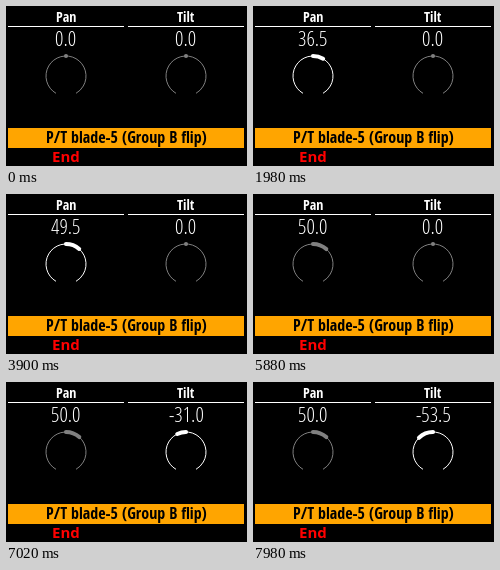
These frames come from a looping animation (241 px wide and 160 px high, 8000 ms). An HTML page with a canvas:

```html
<!DOCTYPE html>
<html lang="en">
<head>
<meta charset="utf-8">
<title>Pan / Tilt encoders</title>
<style>
html, body { margin: 0; height: 100%; background: #000; overflow: hidden; }
canvas { display: block; }
</style>
</head>
<body>
<canvas id="stage" width="241" height="160"></canvas>
<script>
const ctx = document.getElementById('stage').getContext('2d');
const LOOP = 8000, STEP = 60;
const BOLD = '"Open Sans Condensed", "Open Sans", "Noto Sans", sans-serif';
const LIGHT = '"Open Sans Condensed Light", "Open Sans Cond Light", "Open Sans", "Noto Sans", sans-serif';

const linear = u => u;
const gentle = u => 0.4 * u + 0.6 * u * u * (3 - 2 * u);
const easeOut = u => 1 - (1 - u) ** 1.375;

// Each turn moves the dial to a value between two times; it is lit while active.
const pan = {
  name: 'Pan', x: 60,
  turns: [
    { start: 1020, end: 2520, to: 54, ease: gentle },
    { start: 2580, end: 3060, to: 50, ease: linear },
    { start: 3840, end: 3900, to: 49.5, ease: linear },
    { start: 5160, end: 5220, to: 50, ease: linear }
  ],
  isActive: time => (time >= 960 && time < 4020) || (time >= 4680 && time < 5880)
};
const tilt = {
  name: 'Tilt', x: 180,
  turns: [{ start: 6180, end: 7980, to: -53.5, ease: easeOut }],
  isActive: time => time >= 6060
};

function valueAt(turns, time) {
  const value = turns.reduce((from, { start, end, to, ease }) => {
    const progress = Math.min(1, Math.max(0, (time - start) / (end - start)));
    return from + (to - from) * ease(progress);
  }, 0);
  return Math.round(value * 2) / 2;
}

// Centred text that begins on a whole pixel
function label(text, x, y, font, color) {
  ctx.font = font;
  ctx.fillStyle = color;
  ctx.fillText(text, Math.round(x - ctx.measureText(text).width / 2), y);
}

// Angles in degrees, clockwise from the top
function arc(x, from, to, width) {
  const radians = degrees => (degrees - 90) * Math.PI / 180;
  ctx.lineWidth = width;
  ctx.beginPath();
  ctx.arc(x, 70, 20, radians(from), radians(to));
  ctx.stroke();
}

function drawDial({ name, x, turns, isActive }, time) {
  const value = valueAt(turns, time);
  const angle = value / 180 * 150;

  label(name, x, 16, `bold condensed 14px ${BOLD}`, '#fff');
  ctx.fillRect(x - 58, 20, 116, 1);
  label(value.toFixed(1), x, 40, `300 condensed 21px ${LIGHT}`, '#fff');

  ctx.strokeStyle = isActive(time) ? '#fff' : '#808080';
  ctx.lineCap = 'butt';
  arc(x, -150, 150, 1);
  ctx.lineCap = 'round';
  arc(x, Math.min(angle, -0.1), Math.max(angle, 0.1), 4);
}

function draw(elapsed) {
  const time = Math.floor(elapsed % LOOP / STEP) * STEP;
  ctx.fillStyle = '#000';
  ctx.fillRect(0, 0, 241, 160);
  drawDial(pan, time);
  drawDial(tilt, time);
  ctx.fillStyle = '#ffa500';
  ctx.fillRect(2, 122, 236, 20);
  label('P/T blade-5 (Group B flip)', 120, 137, `bold condensed 16px ${BOLD}`, '#000');
  label('End', 60, 156, 'bold 15px "Open Sans", "Noto Sans", sans-serif', '#f00');
}

const start = performance.now();
function tick() {
  draw(performance.now() - start);
  requestAnimationFrame(tick);
}
tick();
</script>
</body>
</html>
```
